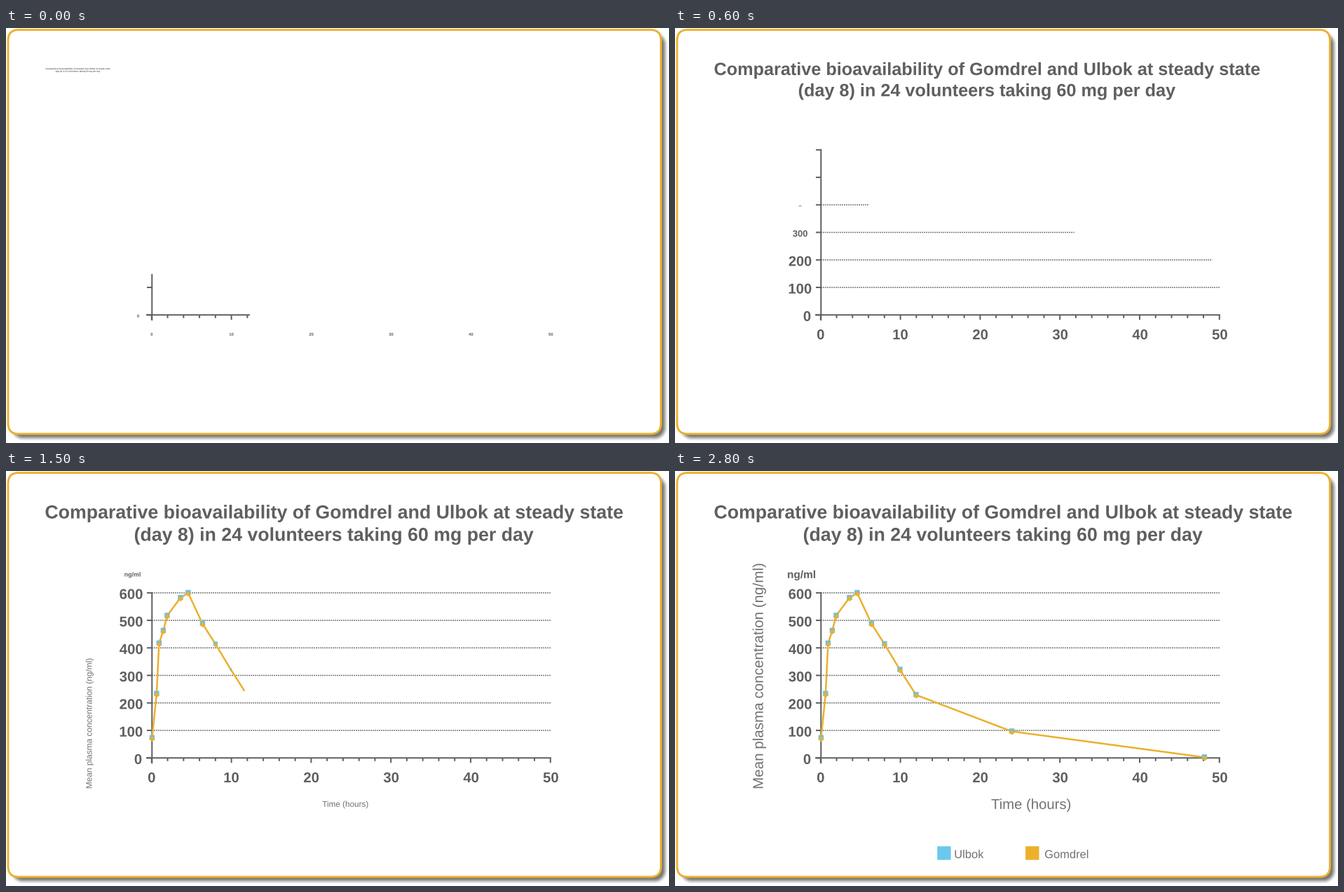
A matplotlib script for the animation above (2.9 s loop, 946 px wide and 592 px high).

```python
import numpy as np
import matplotlib.pyplot as plt
from matplotlib.animation import FuncAnimation
from matplotlib.patches import FancyBboxPatch, PathPatch
from matplotlib.path import Path
from matplotlib.textpath import TextPath
from matplotlib.transforms import Affine2D

W, H, DPI = 946, 592, 64
PX = 72 / DPI  # points per pixel
FRAMES, INTERVAL = 29, 100

GREY, LIGHT, GRID = "#5e5f61", "#717274", "#4c4d4f"
GOLD, BLUE, MARKER = "#ecb02d", "#6cc8ec", "#74c0d6"
AX_X, AX_Y, AX_W, AX_H = 208.3, 409.3, 568.7, 235.5
STEP_RATE = 0.231
ROW_STARTS = [-1.3, 0, 1.75, 3.25, 5.48, 7.05, 8.6]

fig = plt.figure(figsize=(W / DPI, H / DPI), dpi=DPI, facecolor="white")
ax = fig.add_axes([0, 0, 1, 1])
ax.axis("off")


def draw_card():
    """Soft shadow below a white rounded card with a gold edge."""
    left, top, right, bottom, radius = 3, 2.6, 934.5, 579, 15
    yy, xx = np.mgrid[0:H, 0:W] + 0.5
    cx, cy = (left + right) / 2 + 6, (top + bottom) / 2 + 6
    qx = np.abs(xx - cx) - (right - left) / 2 + radius
    qy = np.abs(yy - cy) - (bottom - top) / 2 + radius
    dist = np.hypot(np.maximum(qx, 0), np.maximum(qy, 0))
    dist += np.minimum(np.maximum(qx, qy), 0) - radius
    t = np.clip(0.5 - dist / 9, 0, 1)
    shade = 1 - 0.53 * t * t * (3 - 2 * t)
    ax.imshow(np.dstack([shade] * 3), extent=(0, W, H, 0),
              interpolation="nearest", aspect="auto", zorder=0)
    ax.add_patch(FancyBboxPatch(
        (left, top), right - left, bottom - top,
        boxstyle=f"round,pad=0,rounding_size={radius}",
        fc="white", ec=GOLD, lw=2.9 * PX, zorder=1))


draw_card()
ax.set_xlim(0, W)
ax.set_ylim(H, 0)

growing = []


def grow(path, x, y, color, start, rate=STEP_RATE, angle=0, z=5):
    """Add a shape that scales up about (x, y) from the given time on."""
    patch = PathPatch(path, fc=color, ec="none", lw=0, zorder=z, snap=False)
    ax.add_patch(patch)
    growing.append((patch, x, y, start, rate, angle))


def text_path(text, size, weight="normal", align="left"):
    """Outline with its anchor at half the cap height."""
    path = TextPath((0, 0), text, size=size,
                    prop={"family": "Liberation Sans", "weight": weight})
    box = path.get_extents()
    dx = box.x0 if align == "left" else (box.x0 + box.x1) / 2
    return path.transformed(Affine2D().translate(-dx, -0.36 * size))


def square(size):
    return Path.unit_rectangle().transformed(
        Affine2D().translate(-0.5, -0.5).scale(size))


def line(color, width, z, **kw):
    return ax.plot([], [], color=color, lw=width * PX, zorder=z,
                   snap=False, **kw)[0]


# Title
TITLE_START, TITLE_RATE = -0.807, 0.13875
first = text_path("Comparative bioavailability of Gomdrel and Ulbok at steady state",
                  26.72, "bold")
second = text_path("(day 8) in 24 volunteers taking 60 mg per day",
                   26.72, "bold", "center")
second = second.transformed(
    Affine2D().translate(first.get_extents().x1 / 2, -32))
for part in (first, second):
    grow(part, 56.5, 58, GREY, TITLE_START, TITLE_RATE)

# Axis labels
for i, start in enumerate(ROW_STARTS):
    grow(text_path(str(100 * i), 20.3, "bold", "center"),
         178.5 if i else 188.5, AX_Y + 1.4 - i * AX_H / 6, GREY, start)
for i in range(6):
    grow(text_path(str(10 * i), 20.3, "bold", "center"),
         207.8 + 113.9 * i, 436.8, GREY, -1.25)
grow(text_path("ng/ml", 15.4, "bold", "center"), 180.5, 147.3, GREY, 12.5)
grow(text_path("Mean plasma concentration (ng/ml)", 20.6),
     118.2, 452.3, LIGHT, 12.5, angle=-90)
grow(text_path("Time (hours)", 20.3), 451.5, 474.8, LIGHT, 12.5)

# Legend
for x, tx, name, color, start in ((383.9, 399.5, "Ulbok", BLUE, 22.1),
                                  (509.8, 528, "Gomdrel", GOLD, 23.6)):
    grow(square(19.4), x, 545, color, start)
    grow(text_path(name, 16.5), tx, 546.3, LIGHT, start)

# Axes, ticks and grid
x_axis, y_axis = line(GREY, 2, 4), line(GREY, 2, 4)
ticks = []
for i in range(26):
    x = 207.8 + 22.76 * i
    tick = line(GREY, 2, 4, solid_capstyle="butt")
    tick.set_data([x, x], [AX_Y, AX_Y + (7 if i % 5 == 0 else 4.5)])
    ticks.append((tick, i / 25))
for i in range(7):
    y = AX_Y - i * AX_H / 6
    tick = line(GREY, 2, 4, solid_capstyle="butt")
    tick.set_data([201, AX_X], [y, y])
    ticks.append((tick, i / 6))
grid = [line(GRID, 1.5, 3, linestyle=(0, (1, 1)), dash_capstyle="butt")
        for _ in ROW_STARTS[1:]]

# Plasma curve
points = 0.4 + np.array([
    (208, 380.5), (214.5, 317.5), (218, 245.5), (224, 227.5), (229.5, 206),
    (248.5, 180.5), (259.5, 173.5), (280, 217.5), (298.5, 246.5),
    (320.5, 283), (343.5, 319), (480, 371), (755, 408)])
reach = np.r_[0, np.cumsum(np.hypot(*np.diff(points, axis=0).T))]
CURVE_START, CURVE_SPEED = 11.58, 112
curve = line(GOLD, 2.5, 7, solid_joinstyle="round", solid_capstyle="butt")
diamond = square(5.4).transformed(Affine2D().rotate_deg(45))
for (x, y), r in zip(points, reach):
    start = CURVE_START + r / CURVE_SPEED
    grow(square(7.4), x, y - 0.5, MARKER, start, 1.2, z=8)
    grow(diamond, x + 0.3, y + 1.5, GOLD, start, 1.2, z=9)


def update(k):
    for patch, x, y, start, rate, angle in growing:
        s = min(1, (k - start) * rate)
        patch.set_visible(s > 0)
        if s > 0:
            place = Affine2D().scale(s, -s).rotate_deg(angle).translate(x, y)
            patch.set_transform(place + ax.transData)

    p = min(1, 0.244 * (k + 1))
    x_axis.set_data([201, AX_X + AX_W * p], [AX_Y, AX_Y])
    y_axis.set_data([AX_X, AX_X], [AX_Y + 7, AX_Y - AX_H * p])
    for tick, at in ticks:
        tick.set_visible(at <= p)

    for i, row in enumerate(grid, 1):
        s = np.clip((k - ROW_STARTS[i]) * STEP_RATE, 0, 1)
        y = AX_Y - i * AX_H / 6
        row.set_data([AX_X, AX_X + AX_W * s], [y, y])
        row.set_visible(s > 0)

    length = min(reach[-1], (k - CURVE_START) * CURVE_SPEED)
    curve.set_visible(length > 0)
    if length > 0:
        tip = [np.interp(length, reach, c) for c in points.T]
        curve.set_data(*np.vstack([points[reach < length], tip]).T)
    return []


anim = FuncAnimation(fig, update, frames=FRAMES, interval=INTERVAL,
                     repeat=True, repeat_delay=0, blit=False)
plt.show()
```
